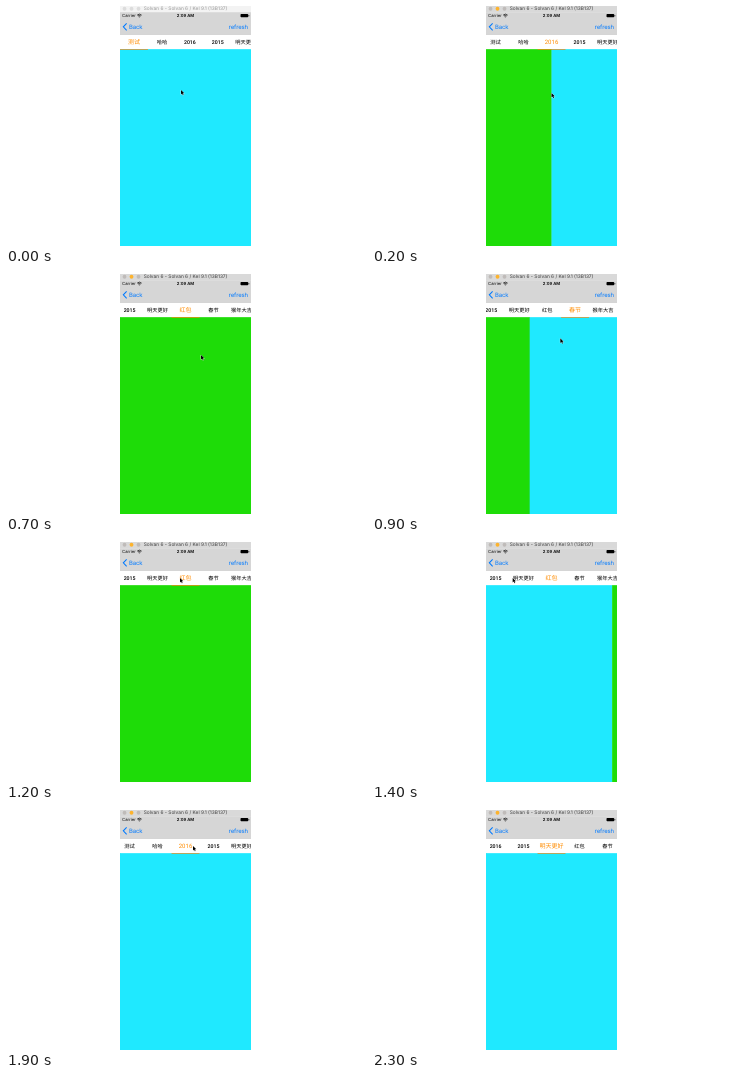
Write an HTML page that moves like this. It is 360x240 px and loops after 2.4 s.

```html
<!DOCTYPE html>
<html lang="zh-CN">
<head>
<meta charset="utf-8">
<title>Scrolling tabs</title>
<style>
  html, body { margin: 0; width: 100%; height: 100%; overflow: hidden; background: #fff; }
  svg { display: block; width: 360px; height: 240px; }
  text { font-family: Inter, "Noto Sans CJK SC", "Noto Sans CJK", sans-serif; text-rendering: geometricPrecision; }
  .mid { text-anchor: middle; }
  .bar { font-size: 17px; fill: #007aff; letter-spacing: -.4px; }
  .status { font-size: 12px; }
  #tabs text { font-family: Roboto, "Noto Sans CJK SC", "Noto Sans CJK", sans-serif; font-size: 15px; font-weight: 500; text-anchor: middle; }
  #tabs .on { font-size: 17.25px; font-weight: 400; fill: #ff8c00; }
  #caption { font-size: 13.8px; fill: #999; }
  #titlebar { fill: #f3f3f3; }
  #lights circle { fill: #dcdcdc; }
  .active #titlebar { fill: #d9d9d9; }
  .active #caption { fill: #3c3c3c; }
  .active #lights circle { fill: #bfbbb9; }
  .active #lights .amber { fill: #fdb32d; }
</style>
</head>
<body>
<svg viewBox="0 0 360 240">
  <defs><clipPath id="screen"><rect x="0" y="-20" width="375" height="700"/></clipPath></defs>
  <!-- 375-point phone screen, origin at the top of the status bar -->
  <g transform="translate(114 6.2) scale(.34933)">
    <g id="phone" clip-path="url(#screen)">
      <rect y="64" width="375" height="44" fill="#fff"/>
      <g id="pages"></g>
      <g id="tabs"><rect id="line" y="105.5" width="80" height="2.4" fill="#ff7f00" opacity=".75"/></g>

      <rect id="titlebar" y="-20" width="375" height="20"/>
      <g id="lights">
        <circle cx="13" cy="-10" r="5.5"/>
        <circle class="amber" cx="33" cy="-10" r="5.5"/>
        <circle cx="53" cy="-10" r="5.5"/>
      </g>
      <text id="caption" class="mid" x="187.5" y="-5">Solvan 6 - Solvan 6 / Kel 9.1 (13B137)</text>

      <rect width="375" height="64" fill="#d6d6d6"/>
      <rect y="63" width="375" height="1" fill="#b2b2b2"/>
      <text class="status" x="6" y="14.5">Carrier</text>
      <g fill="none" stroke="#000" stroke-width="2">
        <path d="M49 8.5Q55.5 2.5 62 8.5M51.5 11Q55.5 7.5 59.5 11"/>
        <path d="M54 13.5H57"/>
      </g>
      <text class="status mid" x="187.5" y="14.5" font-weight="600">2:09 AM</text>
      <rect x="345" y="5.5" width="22" height="9" rx="2"/>
      <rect x="368" y="8" width="2" height="4" rx="1"/>
      <path d="M19 32L9.5 42L19 52" fill="none" stroke="#007aff" stroke-width="3"/>
      <text class="bar" x="26" y="48">Back</text>
      <text class="bar" x="366" y="48" text-anchor="end">refresh</text>
    </g>
    <g id="cursor">
      <path transform="scale(.82)" d="M0 0V16L4 12.5L6.5 18.5L9 17.5L6.5 11.5H11.5Z" stroke="#fff" stroke-width="2" paint-order="stroke"/>
    </g>
  </g>
</svg>
<script>
const LOOP = 2400, STEP = 100, WIDTH = 375, TAB = 80;
const names = ["测试", "哈哈", "2016", "2015", "明天更好", "红包", "春节", "猴年大吉"];

// Where the pointer and pages rest; a tap glides straight there, otherwise pages are swiped.
const stops = [
  { t: 0, tab: 0, x: 175, y: 84 },
  { t: 400, tab: 3, x: 184, y: 90 },
  { t: 700, tab: 5, x: 195, y: 81 },
  { t: 1000, tab: 6, x: 185, y: 56 },
  { t: 1200, tab: 5, x: 174, y: 36, tap: true },
  { t: 1500, tab: 2, x: 124, y: 36, tap: true },
  { t: 1700, tab: 0, x: 124, y: 36, tap: true },
  { t: 1900, tab: 2, x: 187, y: 36, tap: true },
  { t: 2300, tab: 4, x: 208, y: 38 }
];

const get = id => document.getElementById(id);
const phone = get("phone"), pages = get("pages"), tabs = get("tabs");
const line = get("line"), cursor = get("cursor");

function add(parent, tag, attrs, text = "") {
  const el = document.createElementNS("http://www.w3.org/2000/svg", tag);
  for (const key in attrs) el.setAttribute(key, attrs[key]);
  el.textContent = text;
  parent.append(el);
  return el;
}

const move = (el, x, y = 0) => el.setAttribute("transform", `translate(${x} ${y})`);
const mix = (a, b, p) => a + (b - a) * p;
const easeOut = p => 1 - (1 - p) ** 4;

const labels = names.map((name, i) => {
  add(pages, "rect", {
    x: i * WIDTH, y: 105.8, width: WIDTH + 1, height: 575,
    fill: i % 2 ? "#1edc08" : "#1fe9ff"
  });
  return add(tabs, "text", { x: (i + .5) * TAB, y: 91.5 }, name);
});

const maxScroll = names.length * TAB - WIDTH;
const scrollFor = i => Math.max(0, Math.min(maxScroll, (i + .5) * TAB - WIDTH / 2));

function draw(t) {
  const next = stops.find(stop => stop.t > t);
  const from = stops.findLast(stop => stop.t <= t);
  const to = next || from;
  const p = next ? (t - from.t) / (to.t - from.t) : 0;
  const page = mix(from.tab, to.tab, to.tap ? easeOut(p) : p);
  const selected = to.tap ? from.tab : Math.round(page);

  move(pages, -page * WIDTH);
  move(tabs, -scrollFor(selected));
  line.setAttribute("x", Math.round(page) * TAB);
  labels.forEach((label, i) => label.classList.toggle("on", i === selected));
  phone.classList.toggle("active", t > 0);
  cursor.style.display = next ? "" : "none";
  move(cursor, (mix(from.x, to.x, p) - 114) / .34933, (mix(from.y, to.y, p) - 6.2) / .34933);
}

const start = performance.now();
function tick() {
  const t = Math.max(0, performance.now() - start) % LOOP;
  draw(Math.floor(t / STEP) * STEP);
  requestAnimationFrame(tick);
}
tick();
</script>
</body>
</html>
```
